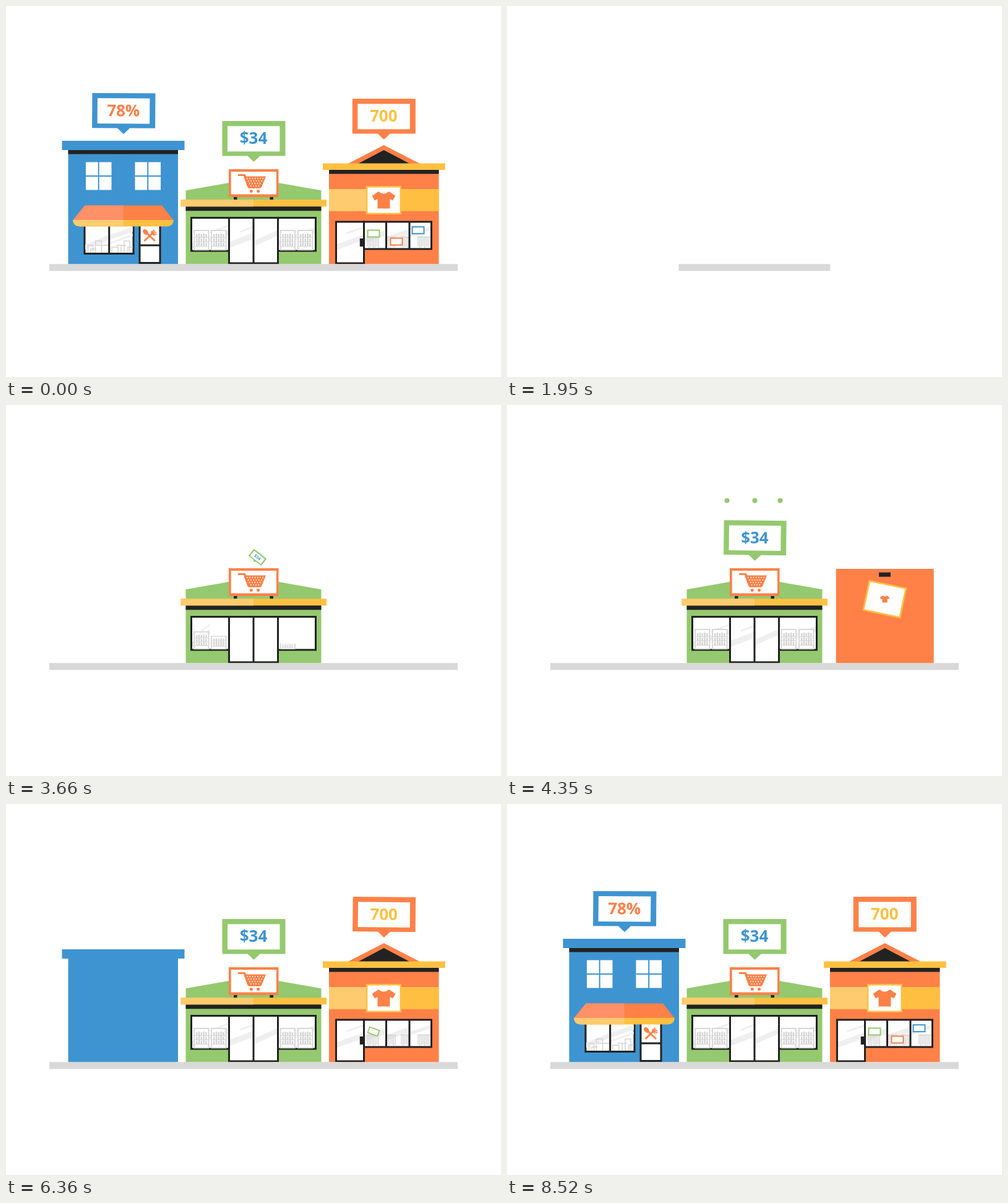
Animation, 800 px wide and 600 px high, one loop 8.55 s. Source, as an HTML page:

```html
<!DOCTYPE html>
<html lang="en">
<head>
<meta charset="utf-8">
<title>Three shops</title>
<style>
html, body { margin: 0; width: 100%; height: 100%; overflow: hidden; background: #fff; }
svg { display: block; width: 800px; height: 600px; }
text { font: 700 26px "Open Sans", "Noto Sans", sans-serif; text-anchor: middle; }
</style>
</head>
<body>
<svg id="stage" viewBox="0 0 800 600">
  <defs><clipPath id="above"><rect width="800" height="417.3"/></clipPath></defs>
</svg>
<script>
const LOOP = 8550, STEP = 30;
const BLUE = '#3e94d1', GREEN = '#94c96f', ORANGE = '#ff8148', GOLD = '#ffc042',
  PALE = '#ffcb6f', INK = '#222', GREY = '#d4d4d4', SHINE = '#efefef';
const stage = document.getElementById('stage');

const group = (parent, markup = '') => {
  const g = document.createElementNS('http://www.w3.org/2000/svg', 'g');
  g.innerHTML = markup;
  parent.append(g);
  return g;
};
const rect = (x, y, w, h, fill) => `<rect x="${x}" y="${y}" width="${w}" height="${h}" fill="${fill}"/>`;
const frame = (x, y, w, h, line, sw) =>
  `<rect x="${x + sw / 2}" y="${y + sw / 2}" width="${w - sw}" height="${h - sw}" fill="#fff" stroke="${line}" stroke-width="${sw}"/>`;
const path = (d, fill) => `<path d="${d}" fill="${fill}"/>`;
const lines = (d, color, w = 1) => `<path d="${d}" fill="none" stroke="${color}" stroke-width="${w}"/>`;
const circle = (x, y, r, fill) => `<circle cx="${x}" cy="${y}" r="${r}" fill="${fill}"/>`;
const stripe = (x1, y1, x2, y2, h) => path(`M${x1} ${y1}L${x2} ${y2}v${h}L${x1} ${y1 + h}z`, SHINE);

const clamp = u => Math.max(0, Math.min(1, u));
const easeIn = u => u * u;
const easeOut = u => 1 - (1 - u) ** 3;
const easeInOut = u => u < .5 ? 2 * u * u : 1 - 2 * (1 - u) ** 2;
const back = u => u <= 0 ? 0 : 1 + 2.7 * (u - 1) ** 3 + 1.7 * (u - 1) ** 2;
const span = (t, start, dur) => clamp((t - start) / dur);
const track = (keys, t) => {
  if (t <= keys[0][0]) return keys[0][1];
  for (let i = 1; i < keys.length; i++) {
    const [a, va] = keys[i - 1], [b, vb] = keys[i];
    if (t <= b) return va + (vb - va) * easeInOut((t - a) / (b - a));
  }
  return keys[keys.length - 1][1];
};

const updates = [];
const place = (el, px, py, sx, sy, rot = 0, dy = 0) => {
  const shown = sx > .002 && sy > .002;
  el.setAttribute('visibility', shown ? 'visible' : 'hidden');
  if (shown) el.setAttribute('transform',
    `translate(${px} ${py + dy}) rotate(${rot}) scale(${sx} ${sy}) translate(${-px} ${-py})`);
};

// kind: x, y, grow or pop; a part shows until it leaves and again once it enters
function part(parent, markup, kind, [px, py], [inAt, inDur], [outAt, outDur] = [1750, 1], spin = 0, push = 0) {
  const el = group(parent, markup);
  updates.push(t => {
    const entering = t >= inAt, u = span(t, inAt, inDur);
    const k = entering ? (kind === 'pop' ? back(u) : easeOut(u)) : 1 - easeIn(span(t, outAt, outDur));
    const sx = kind === 'y' ? 1 : k;
    const sy = kind === 'x' ? 1 : kind === 'grow' ? Math.min(1, k * 1.14) : k;
    const rot = kind === 'pop' ? (1 - k) * (entering ? spin : 30) : 0;
    place(el, px, py, sx, sy, rot, entering ? push * (1 - k) : 0);
  });
  return el;
}

function building(offset) {
  const outer = group(stage);
  outer.setAttribute('clip-path', 'url(#above)');
  const g = group(outer);
  updates.push(t => g.setAttribute('transform', `translate(0 ${offset(t)})`));
  return g;
}
const sink = (t, start, dur, depth) => t > 2100 ? 0 : depth * easeIn(span(t, start, dur));

const POP = [[0, 0], [90, .33], [240, 1.1], [450, .965], [620, 1.012], [760, .99], [930, 1]];
const TILT = [[0, 50], [90, 35], [240, -6], [450, 4], [620, -1.5], [760, .6], [930, .4], [1200, 0]];

function label(parent, x, y, color, ink, text, inAt, outAt) {
  const dots = group(parent, [-45, 0, 41].map(d => circle(x + d, y - 97.5, 4, color)).join(''));
  const el = group(parent,
    path(`M${x - 51} ${y - 66}h102v56.5h-41L${x} ${y}l-10 -9.5h-41z`, color) +
    rect(x - 42.5, y - 57.7, 84.5, 41, '#fff') +
    `<text x="${x - .5}" y="${y - 28.7}" fill="${ink}">${text}</text>`);
  updates.push(t => {
    const age = t - inAt;
    const bob = 1.5 * (1 - Math.cos(t / LOOP * 8 * Math.PI));
    const k = age >= 0 ? track(POP, age) : 1 - easeIn(span(t, outAt, 300));
    const rot = age >= 0 ? track(TILT, age) : (1 - k) * 34 + track(TILT, age + LOOP);
    place(el, x, y, k, k, rot, bob);
    const rise = easeOut(span(age, 420, 280));
    const size = age > 420 && age < 830 ? 1 : 0;
    place(dots, x, y, size, size, 0, 38 * (1 - rise));
  });
}

// ground
const ground = group(stage, rect(70, 417.3, 660, 11.2, '#d9d9d9'));
updates.push(t => {
  const k = t < 2150 ? 1 - easeIn(span(t, 1720, 290)) : easeInOut(span(t, 2160, 600));
  place(ground, 400, 423, k, 1);
});

// restaurant
const diner = building(t => t > 2100 ? 17 * (1 - easeInOut(span(t, 6870, 210))) : sink(t, 937, 600, 205));
part(diner, rect(100.5, 233, 177.5, 190, BLUE), 'grow', [189.5, 417], [6072, 290]);
part(diner, rect(100.5, 232, 177.5, 7.5, INK), 'x', [189.5, 233], [7060, 260], [780, 300]);
part(diner, rect(90.5, 218, 198, 15, BLUE), 'x', [189.5, 225], [6170, 170], [1125, 350]);
[[129, 7000, 914], [208.5, 7080, 1058]].forEach(([x, a, b]) =>
  part(diner, rect(x, 252.5, 41.5, 45, '#fff') + lines(`M${x + 20.7} 252v46M${x} 275h42`, BLUE, 2),
    'pop', [x + 20.7, 275], [a, 300], [b, 300], 0));
const dinerWindow = part(diner, frame(125.5, 350, 82, 52, INK, 3), 'y', [166, 352], [7300, 250]);
part(dinerWindow, stripe(128, 386, 165, 371, 8) + stripe(168, 370, 205, 357, 8) + stripe(168, 382, 205, 369, 3),
  'x', [128, 380], [8000, 300]);
part(dinerWindow,
  lines('M132.5 400v-13h8v13M137 400v-7h9M144.5 400v-20h10v20M146 387h22M171 400v-10h10v10M178 387h16M186 387v13M191 400v-20h9v20M197 400v-10h8', GREY, 1.5),
  'y', [166, 400], [7850, 350]);
group(dinerWindow, lines('M166.7 351v50', INK, 3) + lines('M126 400.5h81', INK, 3));
const door = part(diner, frame(214.5, 350, 36, 67, INK, 3) + lines('M215 387h35', INK, 3), 'y', [232, 352], [7380, 220]);
part(door,
  lines('M226 366L241 380M238 366L223.5 380', ORANGE, 3) +
  `<ellipse cx="225.5" cy="365.5" rx="3.6" ry="5.2" fill="${ORANGE}" transform="rotate(-42 225.5 365.5)"/>` +
  lines('M235.5 363.5q-1 5 1.5 6q4 2 6.5 -1M239 361.5l-3 6M241 363.5l-4 4.500M243 366l-6 3', ORANGE, 1.7),
  'pop', [232, 371], [7450, 220]);
part(diner,
  path('M127.500 322.500H252L271 346.500H108z', ORANGE) + path('M127.500 322.500H189.500V346.500H108z', '#ff9068') +
  path('M108 346H271q-1 10.500 -11 10.500H119q-10 0 -11 -10.500z', GOLD) +
  path('M108 346H189.500v10.500H119q-10 0 -11 -10.500z', PALE), 'y', [189, 322], [7150, 260]);
label(diner, 190, 207, BLUE, ORANGE, '78%', 7590, 1058);

// grocery
const market = building(t => sink(t, 1200, 500, 160));
const roof = group(market);
updates.push(t => roof.setAttribute('transform', `translate(0 ${t > 2100 ? 0 : 36 * easeIn(span(t, 1080, 156))})`));
part(roof, path('M290.500 298.300L400 279L509.500 298.300V420H290.500z', GREEN), 'grow', [400, 417], [2290, 320]);
part(market, rect(290.5, 324, 219, 7.3, INK), 'y', [400, 324], [2860, 240]);
const TRIM = [2780, 300];
const shopfront = group(market);
updates.push(t => {
  const k = t < 2200 ? 1 : easeOut(span(t, ...TRIM));
  shopfront.setAttribute('transform', `translate(0 ${-12 * (1 - k)})`);
});
const panes = part(shopfront, frame(298, 341, 204, 56.5, INK, 3), 'y', [400, 341], [2600, 220]);
part(panes, stripe(301, 383, 359, 362, 9) + stripe(330, 365, 359, 354, 3) + stripe(441, 379, 499, 358, 9),
  'x', [301, 380], [3600, 300]);
const bottles = (x, y) => [0, 1, 2, 3, 4].map(i => rect(x + 3 + i * 3.8, y - 5 - i % 2, 2.4, 5 + i % 2, GREY)).join('');
[304, 332, 443.5, 472].forEach((x, i) => part(panes,
  `<rect x="${x}" y="363" width="23.500" height="31.500" fill="#fff" stroke="${GREY}" stroke-width="1.800"/>` +
  [374, 381, 388].map(y => bottles(x, y) + lines(`M${x} ${y + .5}h23.500`, GREY, 1.2)).join(''),
  'y', [x + 12, 395], [3510 + i * 60, 300]));
const doors = part(shopfront, frame(359, 341, 82, 76.5, INK, 3), 'y', [400, 341], [2600, 220]);
part(doors, stripe(362, 381, 399, 367, 10) + stripe(402, 379, 438, 363, 9) + stripe(378, 364, 399, 356, 3),
  'x', [362, 375], [3680, 300]);
group(doors, lines('M400 341v76', INK, 3));
[368, 426.5].forEach(x => part(market, rect(x, 308.5, 5.5, 5, INK), 'y', [x, 313.5], TRIM));
part(market, rect(282.5, 313.3, 235.500, 11, GOLD) + rect(282.5, 313.3, 117.5, 11, PALE), 'y', [400, 313.3], TRIM, [1300, 350]);
const board = part(market, rect(360, 264, 80.5, 45, ORANGE), 'y', [400, 309], [3020, 260], [1150, 200]);
part(board, rect(363.7, 268, 73.3, 36.5, '#fff'), 'y', [400, 286.2], [3120, 260], [1096, 155]);
const holes = [279, 283, 287, 291].map((y, r) =>
  Array.from({ length: 7 - r }, (_, i) => circle(390 + r * 1.9 + i * 4.2, y, .9, '#fff')).join('')).join('');
part(board,
  lines('M375 273.500h10.500l2.500 4', ORANGE, 3) + path('M384 275.500H420L413 293q-.6 1.700 -2.500 1.700H393q-2 0 -2.700 -2z', ORANGE) +
  holes + circle(396.3, 299.6, 2.5, ORANGE) + circle(407.6, 299.6, 2.5, ORANGE),
  'pop', [400, 286], [3250, 330], [850, 250], -40);
label(market, 400.5, 252, GREEN, BLUE, '$34', 3600, 1058);

// clothes shop
const boutique = building(t => sink(t, 780, 587, 192));
part(boutique, path('M552.500 255L610.700 225L669 255z', ORANGE), 'pop', [610.5, 255], [4620, 320], [935, 300].slice(), 0);
part(boutique, path('M569 255L610.700 233L652.500 255z', INK), 'pop', [610.5, 255], [4760, 300], [820, 260], 0);
part(boutique, rect(522, 265, 177.5, 160, ORANGE), 'grow', [610.5, 417], [4100, 480]);
part(boutique, rect(522, 264.5, 177.5, 7, INK), 'x', [610.5, 268], [4339, 300], [1250, 120], 0, 7);
part(boutique, rect(512, 254.500, 197.7, 10.500, GOLD), 'x', [610.5, 260], [4480, 260], [1250, 120]);
part(boutique, rect(522, 296, 177.500, 35.700, GOLD) + rect(522, 296, 88, 35.700, PALE), 'x', [610.5, 314], [5200, 280], [931, 300]);
const sign = part(boutique, frame(581.8, 291, 57.2, 46, GOLD, 2.5), 'pop', [610.5, 314], [4200, 270], [1058, 300], -120);
updates.push(t => { if (t < 2100) place(sign, 610.5, 314, ...Array(2).fill(1 - easeIn(span(t, 1058, 300)))); });
part(boutique,
  path('M602 300q8.500 7 17 0l10.500 7l-4.500 7.500l-4.500 -2.500V327.500H600.500V312l-4.500 2.500l-4.500 -7.500z', ORANGE),
  'pop', [610.5, 314], [4320, 300], [895, 300], 0);
const shopDoor = part(boutique, frame(532, 347.5, 48, 70, INK, 3), 'y', [556, 348], [4860, 260]);
part(shopDoor, stripe(535, 385, 577, 370, 9) + stripe(550, 366, 577, 357, 3), 'x', [535, 380], [5350, 300]);
part(shopDoor, rect(571.8, 376, 6.5, 13, INK), 'y', [575, 382], [5080, 200]);
const display = part(boutique, frame(577, 347.5, 112, 47, INK, 3), 'y', [634, 348], [4920, 260]);
part(display, stripe(580, 374, 613, 363, 9) + stripe(616, 373, 650, 361, 9) + stripe(654, 368, 686, 357, 6),
  'x', [580, 370], [5400, 300]);
const rack = (x, n) => lines(`M${x} 373.500h${n * 2.6}`, GREY, 1.5) +
  Array.from({ length: n }, (_, i) => lines(`M${x + 1 + i * 2.6} 373v${16 + i * 5 % 3}`, GREY, 1.4)).join('');
[[583, 8], [615, 6], [638, 5], [665, 8]].forEach(([x, n], i) =>
  part(display, rack(x, n), 'y', [x, 392], [5250 + i * 50, 280]));
group(display, lines('M578.500 348v46M614.500 348v46M652 348v46', INK, 3));
[[594, 368, GREEN, 6276, 760], [631, 381, ORANGE, 6540, 800], [666, 362.7, BLUE, 6860, 840]].forEach(([x, y, c, a, b]) =>
  part(display, frame(x - 10.5, y - 6.5, 21, 13, c, 2), 'pop', [x, y], [a, 300], [b, 250], 160));
label(boutique, 610.8, 216, ORANGE, GOLD, '700', 5520, 924);

const begin = performance.now();
function draw(now) {
  const t = Math.floor(Math.max(0, now - begin) % LOOP / STEP) * STEP;
  updates.forEach(update => update(t));
  requestAnimationFrame(draw);
}
draw(begin);
</script>
</body>
</html>
```
